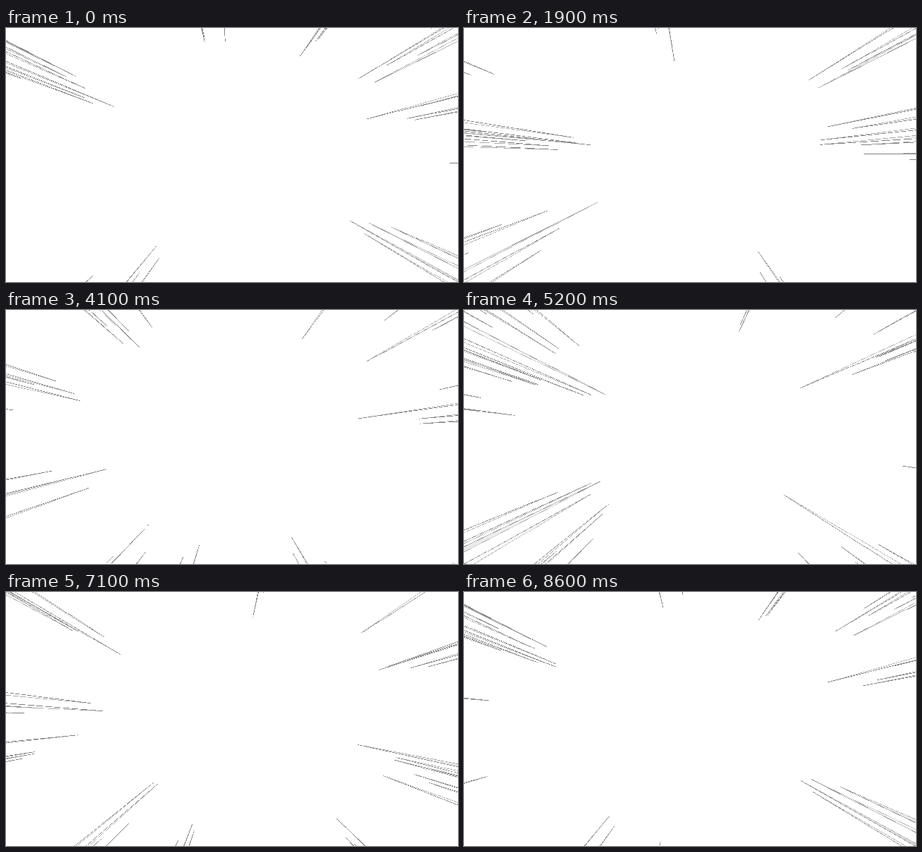
An HTML page with a canvas for the animation above (8.7 s loop, 640 by 360 pixels).

```html
<!DOCTYPE html>
<html lang="en">
<head>
<meta charset="utf-8">
<title>Speed lines</title>
<style>
  html, body { margin: 0; width: 100%; height: 100%; overflow: hidden; background: #fff; }
  canvas { display: block; width: 640px; height: 360px; }
</style>
</head>
<body>
<canvas id="stage" width="640" height="360"></canvas>
<script>
const WIDTH = 640, HEIGHT = 360, CX = WIDTH / 2, CY = HEIGHT / 2;
const LOOP = 8.7, STEP = 0.1, REACH = 380, RECOIL = 350;
const CLUSTERS = 110, FOLLOWERS = 3, GOLDEN_ANGLE = Math.PI * (3 - Math.sqrt(5));
const ctx = document.getElementById('stage').getContext('2d');

let seed = 7;
function random(min, max) {
  seed = (seed * 1664525 + 1013904223) % 4294967296;
  return min + (max - min) * seed / 4294967296;
}

const streaks = [];
function addStreak(peak, angle, radius) {
  streaks.push({
    peak, angle, radius,
    spread: random(1.5e-5, 5e-5),
    shade: random(0, 1) < 0.2 ? random(0.08, 0.2) : 0.025
  });
}

// Clusters are spaced evenly in time and scattered around the circle.
for (let i = 0; i < CLUSTERS; i++) {
  const peak = LOOP * i / CLUSTERS;
  const angle = i * GOLDEN_ANGLE + random(-0.5, 0.5);
  const radius = random(130, 205);
  addStreak(peak, angle, radius);
  for (let j = 0; j < FOLLOWERS; j++) {
    addStreak(peak + random(-0.3, 0.3), angle + random(-0.1, 0.1), radius + random(0, 110));
  }
}

const polar = (radius, angle) => [CX + radius * Math.cos(angle), CY + radius * Math.sin(angle)];

// A hard-edged hairline: only pixels whose centre lies close to the line are set.
function hairline([x0, y0], [x1, y1], color) {
  const dx = x1 - x0, dy = y1 - y0;
  const flat = Math.abs(dx) > Math.abs(dy);
  const length = Math.floor(Math.max(Math.abs(dx), Math.abs(dy)));
  ctx.fillStyle = color;
  for (let i = 0; i <= length; i++) {
    const x = x0 + dx * i / length, y = y0 + dy * i / length;
    if (x < 0 || y < 0 || x >= WIDTH || y >= HEIGHT) continue;
    const across = flat ? y : x;
    if (Math.abs(across - Math.floor(across) - 0.5) < 0.36) {
      ctx.fillRect(Math.floor(x), Math.floor(y), 1, 1);
    }
  }
}

function drawStreak({ peak, angle, radius, spread, shade }, time) {
  const half = LOOP / 2;
  const dt = (time - peak + half + LOOP) % LOOP - half;
  const tipRadius = radius + RECOIL * dt * dt;
  if (tipRadius > REACH - 10) return;

  const fan = spread * (REACH - tipRadius);
  const tip = polar(tipRadius, angle);
  const left = polar(REACH, angle - fan), right = polar(REACH, angle + fan);

  const fade = ctx.createRadialGradient(CX, CY, tipRadius, CX, CY, REACH);
  fade.addColorStop(0, 'rgba(0,0,0,0)');
  fade.addColorStop(1, `rgba(0,0,0,${shade})`);
  ctx.beginPath();
  ctx.moveTo(...left);
  ctx.lineTo(...tip);
  ctx.lineTo(...right);
  ctx.fillStyle = fade;
  ctx.fill();

  hairline(tip, left, '#aaa');
  hairline(tip, right, '#808080');
}

function draw(time) {
  ctx.fillStyle = '#fff';
  ctx.fillRect(0, 0, WIDTH, HEIGHT);
  for (const streak of streaks) drawStreak(streak, time);
}

const steps = Math.round(LOOP / STEP);
let shown = -1;
function tick() {
  const step = Math.floor(performance.now() / (STEP * 1000)) % steps;
  if (step !== shown) draw((shown = step) * STEP);
  requestAnimationFrame(tick);
}
tick();
</script>
</body>
</html>
```
